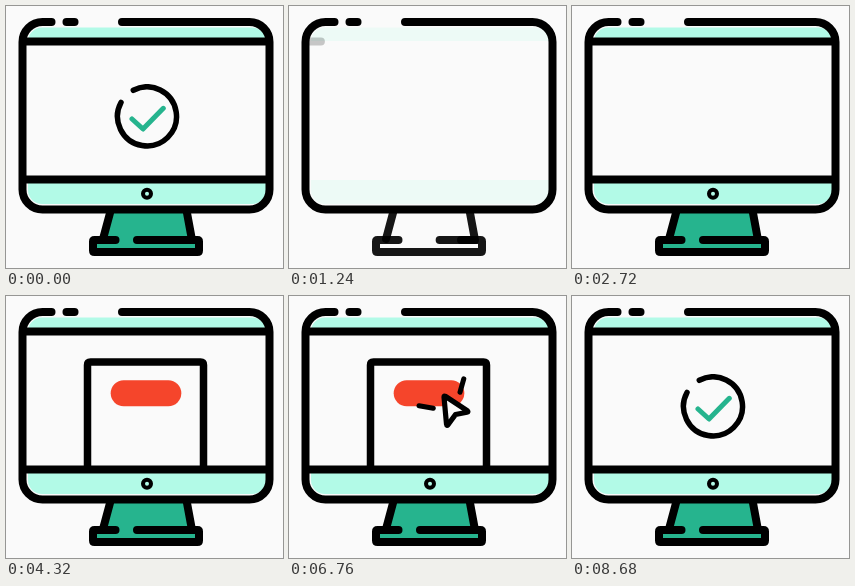
An HTML page for the animation above (9000 ms loop, 277 px wide and 262 px high).

```html
<!DOCTYPE html>
<html lang="en">
<head>
<meta charset="utf-8">
<title>Desktop order</title>
<style>
  html, body { margin: 0; width: 100%; height: 100%; overflow: hidden; background: #fafafa; }
  svg { display: block; width: 100vw; height: 100vh; }
  .line { fill: none; stroke: #000; stroke-width: 8; stroke-linecap: round; stroke-linejoin: round; }
  .mint { fill: #b2fae7; }
  .green { fill: #26b48e; }
  #cursor { transform-box: fill-box; transform-origin: 0 0; }
</style>
</head>
<body>
<svg viewBox="0 0 277 262">
  <defs>
    <clipPath id="screen"><rect x="20" y="39" width="240" height="132"/></clipPath>
  </defs>

  <g id="fill" class="green">
    <path d="M104 205H181L187 234H193V246H87V234H97Z"/>
  </g>
  <g id="bars" class="mint">
    <path d="M22 35A14 14 0 0 1 36 21.5H246A14 14 0 0 1 260 35Z"/>
    <path d="M22 174H260V184A14 14 0 0 1 246 198H36A14 14 0 0 1 22 184Z"/>
  </g>

  <g clip-path="url(#screen)">
    <g id="window">
      <path class="line" style="stroke-width:7.5" d="M81.5 190V69Q81.5 66 84.5 66H194.5Q197.5 66 197.5 69V190"/>
      <rect x="104.7" y="84.2" width="70.6" height="26" rx="13" fill="#f5452b"/>
    </g>
    <path id="rayA" class="line" style="stroke-width:5" d="M144.3 112.3L130 109.8"/>
    <path id="rayB" class="line" style="stroke-width:5" d="M171 96.3L174.8 82.8"/>
    <g id="travel">
      <path id="cursor" class="line" style="fill:#fafafa;stroke-width:5.2" d="M155 101Q155 99.5 156.3 100.3L178.3 114.7Q179.7 116 178 116.3L166.5 118.5L159 128.8Q157.7 130 157.5 128.3Z"/>
    </g>
    <path id="ring" class="line" style="stroke-width:5.5" d="M127.3 84.3A29.5 29.5 0 1 1 115 96.5"/>
    <path id="tick" class="line" style="stroke:#26b48e;stroke-width:5" d="M126 113L137 123L157.3 102.3"/>
  </g>

  <path id="legL" class="line" d="M104 207L97 233"/>
  <path id="legR" class="line" d="M172 234H186L181 207"/>
  <path id="foot" class="line" d="M109.5 234H88.5Q87 234 87 235.5V244.5Q87 246 88.5 246H191.5Q193 246 193 244.5V235.5Q193 234 191.5 234H131"/>
  <path id="topLine" class="line" d="M18 35.5H262"/>
  <path id="lowLine" class="line" d="M18 173.5H262"/>
  <path id="home" class="line" style="stroke-width:4" d="M141 191.8A4 4 0 1 1 141 183.8A4 4 0 1 1 141 191.8"/>
  <path id="case" class="line" d="M45.5 16H36.5A20 20 0 0 0 16.5 36V183.5A20 20 0 0 0 36.5 203.5H243.5A20 20 0 0 0 263.5 183.5V36A20 20 0 0 0 243.5 16H116"/>
  <path id="dash" class="line" d="M60.5 16H68.5"/>
</svg>

<script>
const LOOP = 9000, CUT = 40;      // the finished picture holds until CUT
const EASE = 'cubic-bezier(.42,0,.58,1)';
const OUT = 'cubic-bezier(.2,.7,.3,1)';
const IN = 'cubic-bezier(.6,0,.8,.4)';

// steps: [ms, value, easing to the next step]
function play(id, prop, steps) {
  const first = steps[0][1], last = steps[steps.length - 1][1];
  const all = [[0, last], [CUT, last], [CUT, first], ...steps, [LOOP, last]];
  const frames = all.map(([ms, value, easing = 'linear']) =>
    ({ offset: ms / LOOP, [prop]: value, easing }));
  document.getElementById(id).animate(frames, { duration: LOOP, iterations: Infinity });
}

function fade(id, from, to) {
  play(id, 'opacity', [[from, 0], [to, 1]]);
}

function draw(id, from, to, easing = EASE) {
  const el = document.getElementById(id);
  const len = el.getTotalLength();
  el.style.strokeDasharray = `${len} ${len * 2}`;
  play(id, 'strokeDashoffset', [[from, `${len}px`, easing], [to, '0px']]);
}

// id, draw from, draw to, fade from, fade to
const strokes = [
  ['case', 200, 1120, 200, 920],
  ['dash', 600, 1040, 600, 950],
  ['foot', 460, 1460, 640, 1300],
  ['legL', 360, 1160, 640, 1300],
  ['legR', 200, 1000, 640, 1300],
  ['topLine', 1100, 1940, 1100, 1780],
  ['lowLine', 1340, 2030, 1340, 1910],
  ['home', 1680, 2400, 1680, 1880],
  ['ring', 7640, 8400, 7640, 7760],
  ['tick', 8200, 8680, 8200, 8280],
];
for (const [id, from, to, fadeFrom, fadeTo] of strokes) {
  draw(id, from, to);
  fade(id, fadeFrom, fadeTo);
}

fade('bars', 1100, 1900);
fade('fill', 2040, 2680);

play('window', 'transform', [
  [2960, 'translate(0px,112px)', OUT], [3800, 'translate(0px,0px)'],
  [6900, 'translate(0px,0px)', IN], [7640, 'translate(0px,112px)'],
]);

play('travel', 'transform', [
  [5000, 'translate(112px,78px)', EASE], [5840, 'translate(0px,0px)'],
  [6840, 'translate(0px,0px)', EASE], [7560, 'translate(112px,78px)'],
]);

play('cursor', 'transform', [
  [5960, 'scale(1)', EASE], [6200, 'scale(.82)', EASE], [6440, 'scale(1)'],
]);

for (const id of ['rayA', 'rayB']) {
  draw(id, 6240, 6600, OUT);
  play(id, 'opacity', [[6240, 0], [6320, 1], [6800, 1], [6960, 0]]);
}
</script>
</body>
</html>
```
